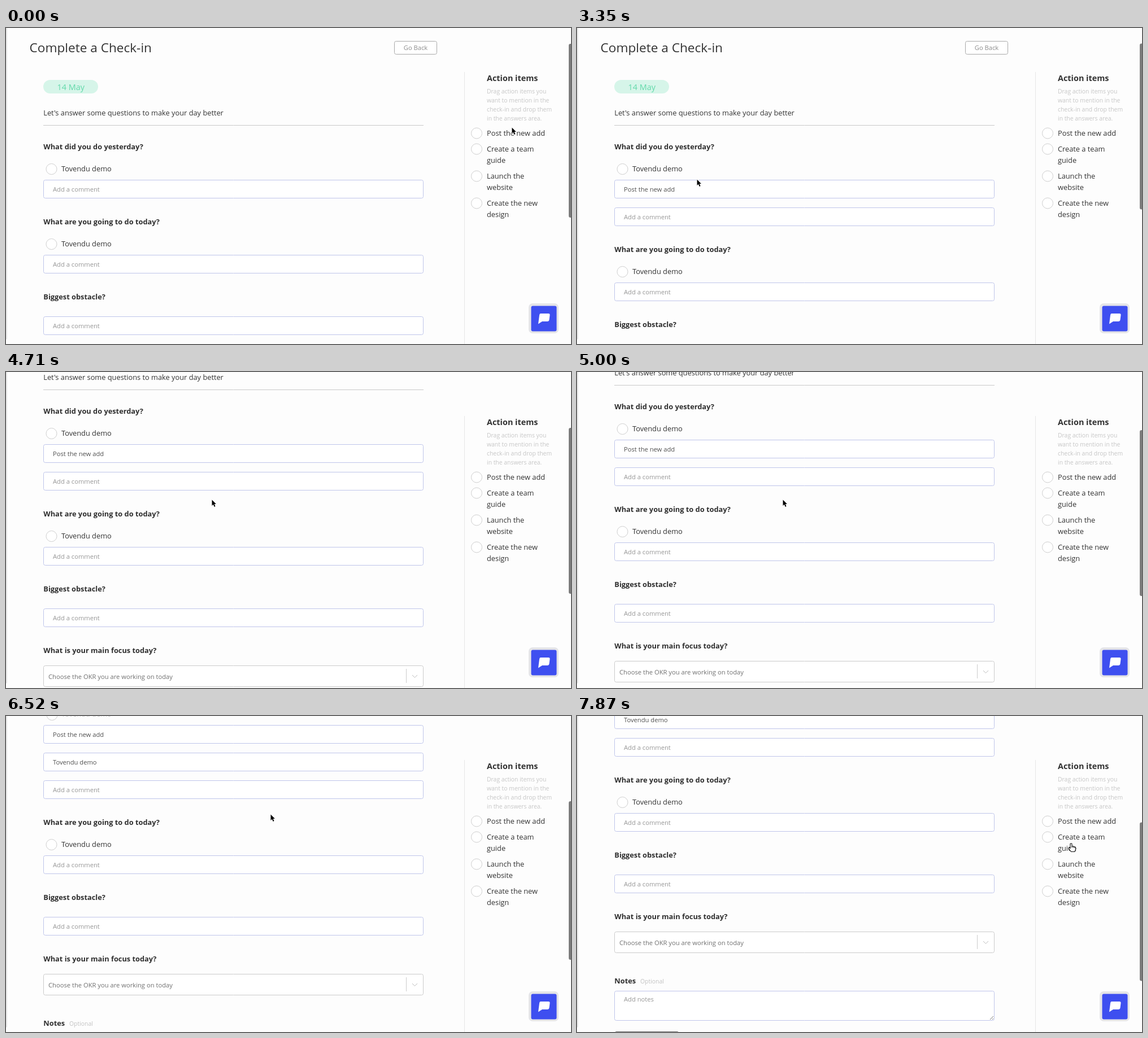
Write an HTML page with a canvas that moves like this. It is 1000 by 560 pixels and loops after 8000 ms.

```html
<!DOCTYPE html>
<html lang="en">
<head>
<meta charset="utf-8">
<title>Daily check-in</title>
<style>
  html, body { margin: 0; width: 100%; height: 100%; overflow: hidden; background: #fdfdfd; }
  canvas { display: block; width: 1000px; height: 560px; }
</style>
</head>
<body>
<canvas id="stage"></canvas>
<script>
const LOOP = 8000, DROP = 3200, CHECK = 5900, HOVER = [6050, 6350], ROW = 49;
const PROJECT = 'Tovendu demo', TASK = 'Post the new add';
const FIELD = '#bfc5ea', FIELD_HOVER = '#959cdc';

// Bursts of movement: start, end, number of steps.
const BURSTS = [
  [140, 530, 3], [830, 1130, 3], [1430, 1580, 2], [1880, 2910, 8], [3060, 4080, 8],
  [4380, 5000, 5], [5300, 5620, 3], [5920, 6070, 2], [6370, 7280, 7], [7430, 7870, 4]
];

// Pointer path: time, x, y, shape.
const POINTER = [
  [0, 895, 176, 'arrow'], [140, 897, 177, 'hand'], [530, 897, 178, 'hand'],
  [830, 870, 180, 'hand'], [1130, 806, 182, 'arrow'],
  [1430, 840, 184, 'hand'], [1580, 876, 184, 'hand'],
  [1880, 832, 186, 'arrow'], [2027, 753, 189, 'arrow'], [2910, 176, 264, 'arrow'],
  [3205, 182, 276, 'arrow'], [4080, 364, 226, 'arrow'], [5000, 364, 226, 'arrow'],
  [5300, 270, 183, 'arrow'], [5620, 87, 98, 'hand'], [5920, 87, 98, 'hand'],
  [6070, 468, 174, 'beam'], [6370, 468, 174, 'arrow'], [6825, 468, 174, 'arrow'],
  [7280, 878, 251, 'hand'], [7870, 874, 225, 'hand']
];

const SHAPES = {
  arrow: new Path2D('M0 0V10.4L2.4 8.2L4.2 12.4L6 11.6L4.2 7.6H7.4Z'),
  hand: new Path2D('M-1.5 9V1.2Q0-.8 1.5 1.2V5.5Q3 4.2 4 6Q5.6 5 6.3 6.8Q8 6.2 8 8V11L6.5 15H0L-4.5 9.2Q-4.5 6.8-2.5 8Z'),
  beam: new Path2D('M-2.5-5.5Q0-5.5 0-4Q0-5.5 2.5-5.5M0-4V4M-2.5 5.5Q0 5.5 0 4Q0 5.5 2.5 5.5M-1.5 1.5H1.5')
};

const canvas = document.getElementById('stage');
const ctx = canvas.getContext('2d');
const ratio = window.devicePixelRatio || 1;
canvas.width = 1000 * ratio;
canvas.height = 560 * ratio;

function snap(t) {
  let held = 0;
  for (const [start, end, steps] of BURSTS) {
    if (t < start) break;
    const step = (end - start) / (steps - 1);
    held = start + step * Math.min(steps - 1, Math.floor((t - start + 25) / step));
  }
  return held;
}

function easeOut(t, start, end, power) {
  const p = Math.min(1, Math.max(0, (t - start) / (end - start)));
  return 1 - Math.pow(1 - p, power);
}

function scrollAt(t) {
  const first = t < 4379 ? 0 : 149 * easeOut(t, 4225, 5000, 3.2);
  const second = t < 6369 ? 0 : 179 * easeOut(t, 6220, 7130, 2.154);
  return Math.round(first + second);
}

function pointerAt(t) {
  let i = POINTER.length - 1;
  while (i > 0 && POINTER[i][0] > t + 1) i--;
  const a = POINTER[i], b = POINTER[i + 1] || a;
  const p = b === a ? 0 : Math.max(0, (t - a[0]) / (b[0] - a[0]));
  return { x: Math.round(a[1] + (b[1] - a[1]) * p), y: Math.round(a[2] + (b[2] - a[2]) * p), shape: a[3] };
}

function text(str, x, y, size, color = '#333', weight = 400, align = 'left') {
  ctx.font = `${weight} ${size}px "Open Sans", sans-serif`;
  ctx.fillStyle = color;
  ctx.textAlign = align;
  ctx.fillText(str, x, y);
}

function box(x, y, w, h, r, fill, stroke) {
  ctx.beginPath();
  ctx.roundRect(x, y, w, h, r);
  if (fill) { ctx.fillStyle = fill; ctx.fill(); }
  if (stroke) { ctx.strokeStyle = stroke; ctx.lineWidth = 1; ctx.stroke(); }
}

function line(color, ...points) {
  ctx.beginPath();
  for (let i = 0; i < points.length; i += 2) ctx.lineTo(points[i], points[i + 1]);
  ctx.strokeStyle = color;
  ctx.lineWidth = 1;
  ctx.stroke();
}

function radio(x, y) {
  ctx.beginPath();
  ctx.arc(x, y, 9.5, 0, Math.PI * 2);
  ctx.fillStyle = '#fff';
  ctx.fill();
  ctx.strokeStyle = '#cfcfcf';
  ctx.lineWidth = 1;
  ctx.stroke();
}

const heading = (str, y) => text(str, 66.3, y, 12.8, '#2e2e2e', 700);

function field(y, value, border = FIELD) {
  box(66.5, y + 0.5, 672, 32, 3, '#fff', border);
  text(value || 'Add a comment', 83, y + 21, 11.2, value ? '#505050' : '#979797');
}

function project(y, done) {
  const shift = done ? 1 : 0;
  radio(80.5 + shift, y + shift);
  text(PROJECT, 98, y + 4, 12.8, done ? '#c4c4c4' : '#333');
  if (done) line('#c4c4c4', 98, y - 0.5, 98 + ctx.measureText(PROJECT).width, y - 0.5);
}

function drawForm(added, hovered) {
  text('Complete a Check-in', 41.6, 43, 22.6);
  box(687.5, 23.5, 75, 23, 3, '#fff', '#a9a9a9');
  text('Go Back', 725, 39, 11.2, '#8c8c8c', 400, 'center');

  box(66, 92, 97, 24, 12, '#d6f5e9');
  text('14 May', 114.8, 109.5, 14.4, '#62d9aa', 400, 'center');
  text("Let's answer some questions to make your day better", 66.3, 154.5, 12.8);
  line('#c9c9c9', 66, 172.5, 739, 172.5);

  heading('What did you do yesterday?', 215);
  project(250, added === 2);
  const values = [TASK, PROJECT].slice(0, added);
  values.forEach((value, i) => field(269 + i * ROW, value, hovered && i === 1 ? FIELD_HOVER : FIELD));
  ctx.translate(0, added * ROW);
  field(269);

  heading('What are you going to do today?', 348);
  project(383, false);
  field(402);
  heading('Biggest obstacle?', 481);
  field(511);

  heading('What is your main focus today?', 590);
  box(66.5, 612.5, 672, 37, 3, '#fff', '#cbcbcb');
  text('Choose the OKR you are working on today', 75, 636, 11.2, '#707070');
  line('#cccccc', 708.5, 618, 708.5, 643);
  line('#bdbdbd', 719, 629, 723.5, 633.5, 728, 629);

  heading('Notes', 704);
  text('Optional', 112, 704, 10.4, '#c2c2c2');
  box(66.5, 717.5, 672, 52, 3, '#fff', FIELD);
  text('Add notes', 83, 736, 11.2, '#979797');
  line('#777', 731, 768, 737, 762);
  line('#777', 735, 768, 737, 766);
  box(67, 789, 113, 32, 3, '#666');
}

function drawSidebar() {
  line('#e6e6e6', 811.5, 78, 811.5, 560);
  text('Action items', 851, 94, 14.4, '#333', 700);
  ['Drag action items you', 'want to mention in the', 'check-in and drop them', 'in the answers area.']
    .forEach((str, i) => text(str, 851, 116 + i * 16, 10.4, '#c6c6c6'));
  const items = [[TASK], ['Create a team', 'guide'], ['Launch the', 'website'], ['Create the new', 'design']];
  let y = 186;
  for (const lines of items) {
    radio(833, y + 0.5);
    lines.forEach((str, i) => text(str, 851, y + 4.5 + i * 20, 12.8));
    y += 8 + lines.length * 20;
  }
}

function drawChat() {
  box(925, 488, 53, 53, 7, '#e5e5e8');
  box(929.5, 492.5, 45, 45, 3, '#3e4ff0');
  ctx.fillStyle = '#fff';
  ctx.fill(new Path2D('M946 506H960Q963 506 962.5 509L961.5 517Q961 520 958 520H949L942 524.5L944 509Q944.3 506 946 506Z'));
}

function drawScrollbar(scroll, added) {
  const top = [28, 27.5 + scroll * 0.507, 24.5 + scroll * 0.5][added];
  box(996, top, 8, [308, 294, 281][added], 3, '#7c7c7c');
}

function drawPointer({ x, y, shape }) {
  const path = SHAPES[shape];
  ctx.save();
  ctx.translate(x + 0.5, y + 0.5);
  ctx.lineJoin = 'round';
  if (shape === 'hand') {
    ctx.fillStyle = '#fff';
    ctx.fill(path);
    ctx.strokeStyle = '#111';
    ctx.lineWidth = 1.1;
    ctx.stroke(path);
    line('#111', 1.5, 5.5, 1.5, 8);
    line('#111', 4, 6, 4, 8);
    line('#111', 6.2, 7, 6.2, 8.5);
  } else {
    ctx.strokeStyle = '#fff';
    ctx.lineWidth = shape === 'arrow' ? 2 : 2.6;
    ctx.stroke(path);
    if (shape === 'arrow') {
      ctx.fillStyle = '#000';
      ctx.fill(path);
    } else {
      ctx.strokeStyle = '#222';
      ctx.lineWidth = 1.1;
      ctx.stroke(path);
    }
  }
  ctx.restore();
}

function draw(now) {
  const t = snap(now % LOOP);
  const scroll = scrollAt(t);
  const added = t >= CHECK ? 2 : t >= DROP ? 1 : 0;
  ctx.setTransform(ratio, 0, 0, ratio, 0, 0);
  ctx.fillStyle = '#fdfdfd';
  ctx.fillRect(0, 0, 1000, 560);
  box(0, -4, 2, 556, [0, 0, 2, 0], '#e5e5e5');

  ctx.save();
  ctx.translate(0, -scroll);
  drawForm(added, t > HOVER[0] && t < HOVER[1]);
  ctx.restore();

  drawSidebar();
  drawChat();
  drawScrollbar(scroll, added);
  drawPointer(pointerAt(t));
  requestAnimationFrame(draw);
}
requestAnimationFrame(draw);
</script>
</body>
</html>
```
